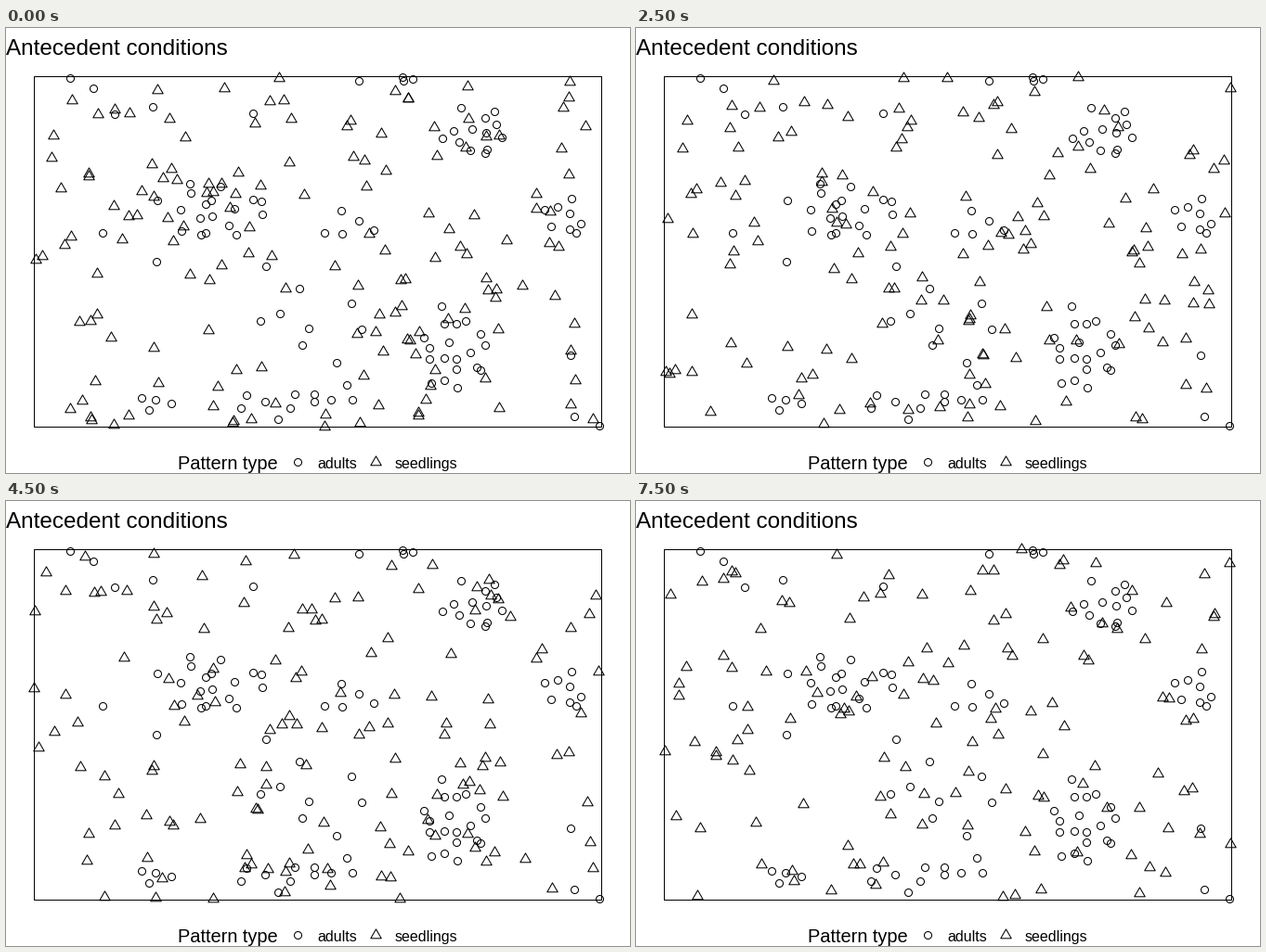
Animation of 672x480 px, one loop 8000 ms. Source, as a matplotlib script:

```python
import numpy as np
import matplotlib.pyplot as plt
from matplotlib.animation import FuncAnimation
from matplotlib.collections import PolyCollection
from matplotlib.patches import Rectangle

W, H, DPI = 672, 480, 96
LEFT, TOP, RIGHT, BOTTOM = 30.5, 52.5, 641.5, 430.5
RADIUS = 4.0
LINE = 0.78  # about one pixel, in points
GOLDEN_ANGLE = np.pi * (3 - np.sqrt(5))

plt.rcParams["font.family"] = "Liberation Sans"

# Stands of adults: centre, number of plants, half width, half height.
STANDS = [
    (507, 115, 13, 42, 30),
    (434, 56, 3, 14, 3),
    (225, 198, 18, 62, 34),
    (604, 205, 8, 25, 25),
    (482, 350, 19, 38, 46),
    (332, 312, 7, 70, 38),
    (158, 405, 4, 22, 10),
    (288, 408, 7, 48, 18),
    (358, 388, 5, 24, 35),
    (370, 212, 5, 35, 22),
]

# Adults standing apart.
LONERS = [(69, 54), (94, 65), (117, 93), (158, 85), (266, 92), (380, 57),
          (104, 221), (162, 252), (280, 257), (608, 353), (612, 419),
          (639, 429)]


def polygon(sides, radius):
    turn = 2 * np.pi * np.arange(sides) / sides
    return radius * np.column_stack([np.sin(turn), -np.cos(turn)])


CIRCLE = polygon(32, RADIUS)
TRIANGLE = polygon(3, 1.65 * RADIUS)


def place(shape, centres):
    """Copy the shape to each centre, aligned to pixel middles."""
    spots = np.floor(np.asarray(centres, float)) + 0.5
    return spots[:, None, :] + shape


def outlines(verts):
    marks = PolyCollection(verts, facecolors="none", edgecolors="black",
                           linewidths=LINE)
    ax.add_collection(marks, autolim=False)
    return marks


def adults():
    """Fill each stand along a loose spiral and add the lone plants."""
    rng = np.random.default_rng(7)
    groups = [np.array(LONERS, float)]
    for x, y, count, wide, high in STANDS:
        k = np.arange(count)
        reach = np.sqrt((k + 0.5) / count)
        turn = k * GOLDEN_ANGLE + rng.uniform(0, 2 * np.pi)
        spots = np.column_stack([x + wide * reach * np.cos(turn),
                                 y + high * reach * np.sin(turn)])
        groups.append(spots + rng.normal(0, (wide / 9, high / 9),
                                         (count, 2)))
    return np.clip(np.vstack(groups), (LEFT, TOP), (RIGHT, BOTTOM))


def seedlings(step):
    """A fresh random pattern, slightly thinner at each step."""
    rng = np.random.default_rng(40 + step)
    return rng.uniform((LEFT, TOP), (RIGHT, BOTTOM), (152 - 3 * step, 2))


fig = plt.figure(figsize=(W / DPI, H / DPI), dpi=DPI, facecolor="white")
ax = fig.add_axes([0, 0, 1, 1])
ax.set_xlim(0, W)
ax.set_ylim(H, 0)
ax.axis("off")

ax.add_patch(Rectangle((LEFT, TOP), RIGHT - LEFT, BOTTOM - TOP, fill=False,
                       edgecolor="black", linewidth=0.75, snap=False))
outlines(place(CIRCLE, adults()))
young = outlines(place(TRIANGLE, seedlings(0)))

for x, y, size, label in [(0, 29, 18.15, "Antecedent conditions"),
                          (185, 476, 15, "Pattern type"),
                          (335.5, 475, 12, "adults"),
                          (418.5, 475, 12, "seedlings")]:
    ax.text(x, y, label, fontsize=size, color="black",
            ha="left", va="baseline")
outlines(place(CIRCLE, [(314, 468)]))
outlines(place(TRIANGLE, [(398, 468)]))


def update(tick):
    # The first and last pattern last one tick, the others two.
    young.set_verts(place(TRIANGLE, seedlings((tick + 1) // 2)))
    return (young,)


anim = FuncAnimation(fig, update, frames=16, interval=500, repeat=True,
                     repeat_delay=0, blit=False)
plt.show()
```
